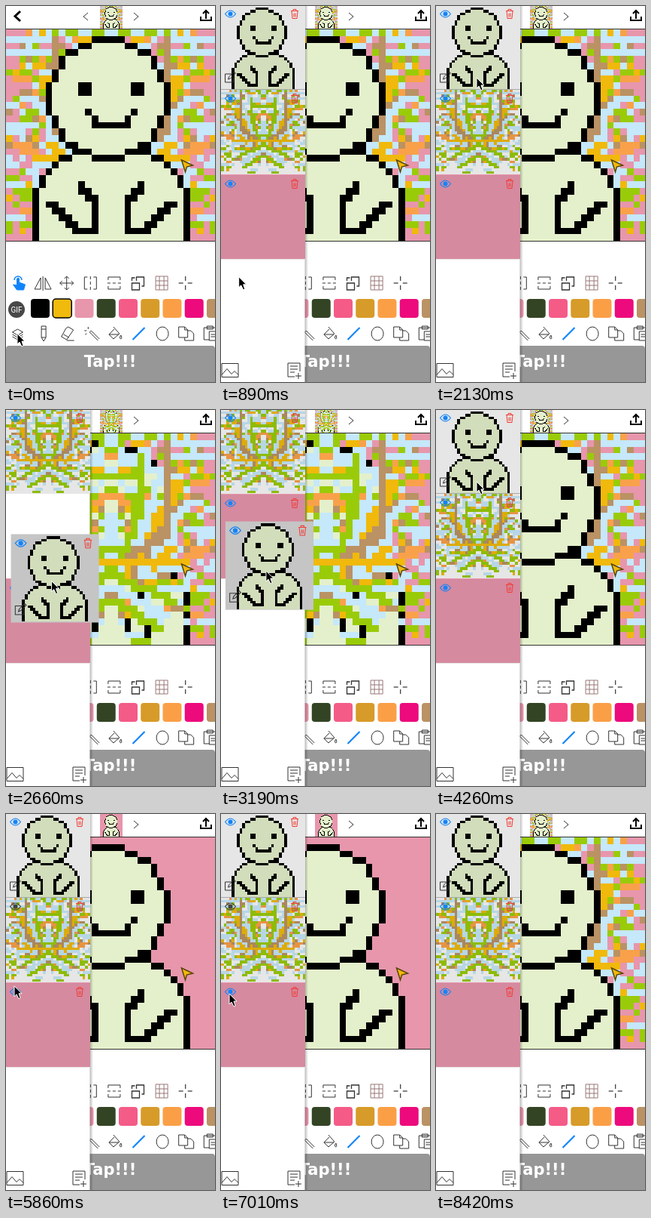
Recreate the animation shown at these times as an HTML page with a canvas. Size 278 by 498 pixels, loop 9 s.

```html
<!DOCTYPE html>
<html lang="en">
<head>
<meta charset="utf-8">
<title>Layer panel</title>
<style>
html, body { margin: 0; width: 100%; height: 100%; overflow: hidden; background: #fff; }
canvas { display: block; width: 278px; height: 498px; }
</style>
</head>
<body>
<canvas id="stage" width="278" height="498"></canvas>
<script>
const LOOP = 9000, N = 32, SLOT = 112, LIFTED = 117;
const BLUE = '#1284fb', RED = '#f23b35', DARK = '#333', CREAM = '#e4f0cb', PINK = '#e796ac';
const SKY = '#c5e8fa', GREEN = '#9acb08', TAN = '#ba9264', GOLD = '#f0b90b', ORANGE = '#f9a14a';
const c = document.getElementById('stage').getContext('2d');

function rect(color, x, y, w, h, g = c) {
  g.fillStyle = color;
  g.fillRect(x, y, w, h);
}

function box(color, x, y, w, h, r, edge) {
  c.beginPath();
  c.roundRect(x, y, w, h, r);
  c.fillStyle = color;
  c.fill();
  if (edge) { c.strokeStyle = edge; c.lineWidth = 1.5; c.stroke(); }
}

// Draws a path at x, y; with turns it is repeated around its centre
function icon(d, x, y, { stroke = DARK, width = 1, fill, turns = 1 } = {}) {
  const p = new Path2D(d);
  c.save();
  c.translate(x, y);
  c.strokeStyle = stroke;
  c.lineWidth = width;
  for (let i = 0; i < turns; i++) {
    if (fill) { c.fillStyle = fill; c.fill(p); }
    c.stroke(p);
    c.rotate(2 * Math.PI / turns);
  }
  c.restore();
}

function grid(paint) {
  const cv = document.createElement('canvas');
  cv.width = cv.height = N;
  paint(cv.getContext('2d'));
  return cv;
}

function mirrored(g, color, x, y, w = 1, h = 1) {
  rect(color, x, y, w, h, g);
  rect(color, N - x - w, y, w, h, g);
}

function line(g, color, ...pts) {
  for (let i = 1; i < pts.length; i++) {
    const [ax, ay] = pts[i - 1], [bx, by] = pts[i];
    const n = Math.abs(bx - ax) + Math.abs(by - ay);
    for (let k = 0; k <= n; k++) {
      mirrored(g, color, Math.round(ax + (bx - ax) * k / n), Math.round(ay + (by - ay) * k / n));
    }
  }
}

// Cream ellipse with a black rim one cell wide
function blob(g, cx, cy, rx, ry) {
  const inside = (x, y) => ((x - cx) / rx) ** 2 + ((y - cy) / ry) ** 2 < 1;
  for (let y = 0; y < N; y++) for (let x = 0; x < N; x++) {
    if (!inside(x, y)) continue;
    const core = inside(x - 1, y) && inside(x + 1, y) && inside(x, y - 1) && inside(x, y + 1);
    rect(core ? CREAM : '#000', x, y, 1, 1, g);
  }
}

const figure = grid(g => {
  blob(g, 15.5, 28.5, 12.5, 12);
  blob(g, 15, 10, 9.35, 9.35);
  mirrored(g, '#000', 11, 8, 2, 2);
  line(g, '#000', [12, 12], [13, 13], [13, 14], [15, 14]);
  line(g, '#000', [11, 23], [13, 26], [13, 30], [11, 30], [6, 26]);
});

const confetti = grid(g => {
  let seed = 77;
  const rnd = () => (seed = (seed * 16807) % 2147483647) / 2147483647;
  const palette = [SKY, SKY, SKY, SKY, GREEN, GREEN, GREEN, TAN, ORANGE, GOLD];
  for (let y = 0; y < N; y++) {
    const density = .7 - .05 * Math.max(0, y - 22);
    let color = null;
    for (let x = 0; x < 16; x++) {
      if (rnd() > .25) color = rnd() < density && palette[Math.floor(rnd() * palette.length)];
      if (color) mirrored(g, color, x, y);
    }
  }
  // Branches fan out from the middle
  [GREEN, SKY, GOLD, TAN, SKY].forEach((color, i) =>
    line(g, color, [16 + i, 21], [19 + 2 * i, 14 - i], [20 + 3 * i, 3 + 2 * i]));
  for (let i = 0; i < 3; i++) line(g, i % 2 ? SKY : GREEN, [16, 21 + 2 * i], [25 - i, 25 + 2 * i]);
  line(g, TAN, [24, 1], [24, 15], [18, 18]);
  line(g, GOLD, [16, 19], [27, 19]);
});

const backdrop = grid(g => rect(PINK, 0, 0, N, N, g));

const between = (t, a, b) => t >= a && t < b;

function ease(t, a, b) {
  const u = Math.min(1, Math.max(0, (t - a) / (b - a)));
  return u * u * (3 - 2 * u);
}

// Each move is [start, end, goal]
function travel(t, from, ...moves) {
  return moves.reduce((v, [a, b, to]) => v + (to - v) * ease(t, a, b), from);
}

const cardY = t => travel(t, 0, [2160, 2900, 218], [2920, 3400, 100], [3900, 4200, 0]);
const cardX = t => cardY(t) * .04;

function pointer(t) {
  const drop = cardY(t);
  const x = travel(t, 15, [620, 1510, 54], [4350, 4880, 11], [7860, 8420, 30]);
  const y = travel(t, 434, [620, 1510, 95], [4350, 4880, 124], [5600, 5920, 238],
    [7100, 7500, 125], [7860, 8420, 505]);
  return [x + cardX(t), y + drop * .8];
}

function artwork(t, x, y, w, h) {
  rect('#fff', x, y, w, h);
  const stack = between(t, 2480, 3950) ? [backdrop, figure, confetti] : [backdrop, confetti, figure];
  for (const layer of stack) {
    if (layer === confetti && between(t, 5320, 7810)) continue;
    if (layer === backdrop && between(t, 6470, 7010)) continue;
    c.drawImage(layer, x, y, w, h);
  }
}

function header(t) {
  icon('M8 0L1 6.500 8 13M3 6.500H1', 11, 7, { stroke: '#000', width: 3 });
  icon('M3-5L-3 0 3 5', 106, 14);
  icon('M-3-5L3 0-3 5', 173, 14);
  icon('M-7 2V7H7V2M0 5V-6M-4-2L0-6 4-2', 266, 12, { stroke: '#000', width: 2 });
  artwork(t, 125, 0, 30, 30);
}

const FLIP = 'M-4-8H-8V8H-4M0-9V-5M0 0V2';
const EDIT_ROW = [
  ['M-3 9L-8 2-3 3V-6Q-1-8 0-6V-1L8 2 6 9Z', { stroke: BLUE, fill: BLUE }],
  ['M-3-7V8H-11ZM0-9V10M3-7V8H11Z'],
  ['M0 0V-9M-3-6L0-9 3-6', { turns: 4 }],
  [FLIP, { turns: 2 }],
  ['M-8-4V-8H8V-4M-9 0H-5M0 0H2', { turns: 2 }],
  ['M-8 0H2V9H-8ZM-2-3V-8H8V4H5M-8-3V-7H-4', { width: 1.3 }],
  ['M-8-9V9H8M-3-9V9M-8 3H8', { stroke: '#977', turns: 2 }],
  ['M0-9V-3', { width: 1.2, turns: 4 }]
];
const DRAW_ROW = [
  ['M-3-6L4-2-3 2-10-2ZM-10 1L-3 5 4 1M-10 4L-3 8 4 4'],
  ['M-3-10H3V5L0 10-3 5ZM-3-6H3M-3 5H3'],
  ['M-2-7L1-9 8-5-1 8-8 4ZM-5 1L2 5M-1 9H9'],
  ['M-2-2L9 9M0-4L11 7M-2-2L0-4M-4-9V-6M-9-4H-6M-8 1L-6 0'],
  ['M-2-9L6 0-2 7-8 1-1-6M-8 1H5M8 2Q5 6 8 7 10 6 8 2'],
  ['M-8 8L8-8', { stroke: BLUE, width: 2.2 }],
  ['M0-9A8 9 0 1 1 0 9A8 9 0 1 1 0-9'],
  ['M-10-9H-2L2-5V5H-10ZM-2-9V-5H2M2-4H6L10 0V9H-2V5'],
  ['M-1 8H-8V-8H8V-3M-4-10H4V-6H-4ZM-1-3H9V9H-1ZM1 1H7M1 4H7']
];
const SWATCHES = ['#000', '#f0bb0c', PINK, '#334424', '#f45b87', '#d79b29', '#fb9f47', '#ed0a7c', TAN];

function tools() {
  EDIT_ROW.forEach(([d, style], i) => icon(d, 17.5 + 31.6 * i, 367, style));
  icon('M-7-4A5 5 0 1 1 3-4', 18, 367, { stroke: BLUE, width: 1.5 });
  DRAW_ROW.forEach(([d, style], i) => icon(d, 18.500 + 31.6 * i, 434, style));
  SWATCHES.forEach((color, i) => box(color, 33 + 29.25 * i, 388, 25, 25, 4, i === 1 && '#000'));

  box('#484848', 3, 391, 22, 22, 11);
  box('#979797', 0, 450, 278, 52, 4);
  c.fillStyle = '#fff';
  c.textAlign = 'center';
  c.font = '10px Roboto, sans-serif';
  c.fillText('GIF', 14, 406);
  c.font = 'bold 21px "DejaVu Sans", sans-serif';
  c.fillText('Tap!!!', 138.5, 478);
}

function card(layer, x, y, { size = SLOT, bg = '#fafafa', visible = true, selected } = {}) {
  rect(bg, x, y, size, size);
  c.drawImage(layer, x, y - 1, size, size);
  rect('rgba(0,0,0,.08)', x, y, size, size);
  c.save();
  c.translate(x, y);
  c.scale(size / SLOT, size / SLOT);
  const eye = visible ? BLUE : '#444';
  icon('M-7 0Q0-9 7 0Q0 9-7 0Z', 12.5, 11.5, { stroke: eye, width: 1.2 });
  box(eye, 9.5, 8.5, 6, 6, 3);
  icon('M-5-4H5M-2-4V-6H2V-4M-4-4L-3 6H3L4-4M-1-1V4M1-1V4', 98, 11.5, { stroke: RED });
  if (selected) icon('M3-5H-6V6H5V-1M-2 2L-1-1 6-8 8-6 1 1Z', 11.5, 96);
  c.restore();
}

function drawer(t) {
  const x = travel(t, -118, [440, 800, 0]);
  if (x <= -118) return;
  c.save();
  c.translate(x, 0);
  const shade = c.createLinearGradient(111, 0, 116, 0);
  shade.addColorStop(0, 'rgba(0,0,0,.3)');
  shade.addColorStop(1, 'rgba(0,0,0,0)');
  rect(shade, 111, 0, 5, 498);
  rect('#fff', 0, 0, 111.5, 498);

  const pinkSlot = travel(t, 2, [2740, 2860, 1], [3230, 3340, 2]);
  const confettiSlot = travel(t, 1, [2360, 2480, 0], [3880, 3990, 1]);
  card(backdrop, 0, pinkSlot * SLOT, { visible: !between(t, 6470, 7010) });
  card(confetti, 0, confettiSlot * SLOT - 1, { visible: !between(t, 5320, 7810) });
  icon('M-11-9H11V9H-11ZM-11 6L-4-2 2 5 6 1 11 6', 12, 482.5);
  icon('M1 9H-8V-9H8V2M-5-5H5M-5-1H5M-5 3H1M6 4V12M2 8H10', 97, 482);

  if (between(t, 2160, 4230)) {
    card(figure, cardX(t), cardY(t), { size: LIFTED, bg: '#d6d6d6', selected: true });
  } else {
    card(figure, 0, -1, { bg: between(t, 1780, 2130) ? '#eee' : '#fafafa', selected: true });
    rect('#aaa', 0, 110, SLOT, 1);
  }
  c.restore();
}

function draw(t) {
  c.imageSmoothingEnabled = false;
  rect('#fff', 0, 0, 278, 498);
  artwork(t, 0, 31, 280, 280);
  rect(DARK, 0, 30, 278, 1);
  rect(DARK, 0, 311, 278, 1);
  icon('M0 0L15 7 7 9 5 16Z', 233.5, 204, { stroke: '#5a430c', width: 1.5, fill: GOLD });
  header(t);
  tools();
  drawer(t);
  icon('M0 0V14L3 11 6 17 8 16 6 10H10Z', ...pointer(t), { stroke: '#fff', fill: '#000' });
}

const start = performance.now();
function tick() {
  draw((performance.now() - start) % LOOP);
  requestAnimationFrame(tick);
}
tick();
</script>
</body>
</html>
```
